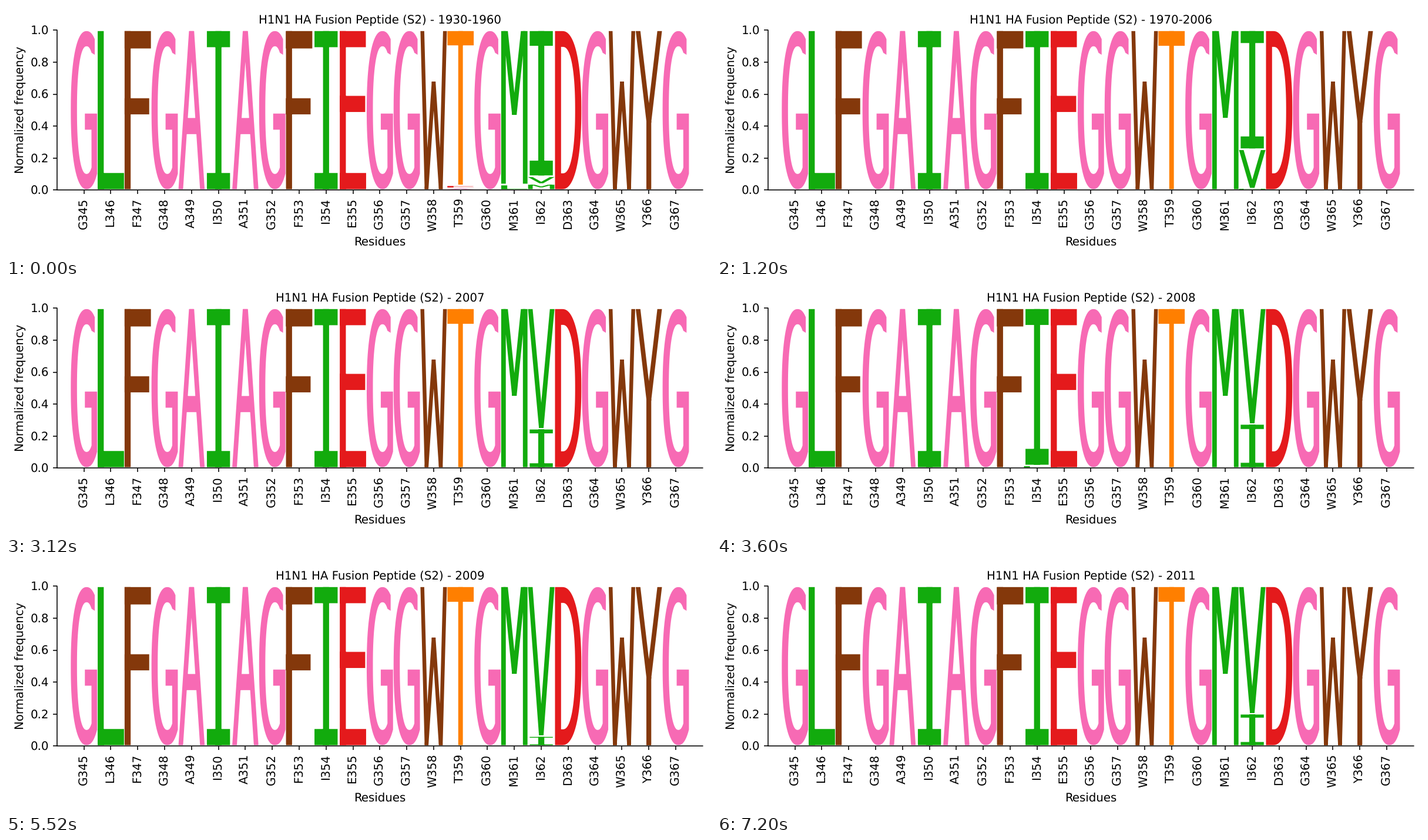
Animation of 1200x427 px, one loop 8000 ms. Source, as a matplotlib script:

```python
import numpy as np
import matplotlib.pyplot as plt
from matplotlib.animation import FuncAnimation
from matplotlib.patches import PathPatch
from matplotlib.path import Path

WIDTH, HEIGHT, DPI = 1200, 427, 128
PT = 141.8 / DPI            # scales point sizes to the drawing
STEP_MS, STEPS, HOLD = 400, 20, 3
FIRST, SEQUENCE = 345, "GLFGAIAGFIEGGWTGMIDGWYG"
PAD = 0.0105                # gap between stacked letters
HALF = 0.489                # half the width of a letter, in columns

COLORS = {}
for group, color in (("GA", "#f76ab4"), ("T", "#ff7f00"), ("FWY", "#84380b"),
                     ("LIMV", "#12ab0d"), ("DE", "#e41a1c")):
    COLORS.update(dict.fromkeys(group, color))

# Share of each letter where a residue varies; the largest one fills up to 1.
PERIODS = {
    "1930-1960": {359: dict(A=0.012, E=0.016, T=1), 361: dict(L=0.034, M=1),
                  362: dict(M=0.038, V=0.048, I=1)},
    "1970-2006": {362: dict(M=0.009, V=0.246, I=1)},
    "2007": {362: dict(I=0.246, V=1)},
    "2008": {354: dict(L=0.015, I=1), 362: dict(I=0.276, V=1)},
    "2009": {362: dict(I=0.062, V=1)},
    "2010": {362: dict(I=0.122, V=1)},
    "2011": {362: dict(I=0.202, V=1)},
}

# Letters are unions of strokes in a box with x from -1 to 1 and y from 0 to 1.
STEM, LIMB, THIN, BAR = 0.46, 0.35, 0.29, 0.102


def stroke(x0, y0, x1, y1, width=LIMB):
    w = width / 2
    return [(x0 - w, y0), (x0 + w, y0), (x1 + w, y1), (x1 - w, y1)]


def stem(x, width=STEM, top=1):
    return stroke(x, 0, x, top, width)


def bar(x0, x1, top, height=BAR):
    return stroke((x0 + x1) / 2, top - height, (x0 + x1) / 2, top, x1 - x0)


def both(*loops):
    return [*loops, *([(-x, y) for x, y in reversed(loop)] for loop in loops)]


def arc(cx, rx, ry, start, end, power=2.3):
    """Part of a superellipse centred on half height."""
    t = np.radians(np.linspace(start, end, 60))
    c, s = np.cos(t), np.sin(t)
    return list(zip(cx + rx * np.sign(c) * np.abs(c) ** (2 / power),
                    0.5 + ry * np.sign(s) * np.abs(s) ** (2 / power)))


def outline(loops):
    return Path.make_compound_path(
        *(Path([*loop, loop[0]], closed=True) for loop in loops))


left_stem = stem(STEM / 2 - 1)
GLYPHS = {letter: outline(loops) for letter, loops in {
    "L": [left_stem, bar(-1, 1, BAR)],
    "F": [left_stem, bar(-1, 1, 1, 0.11), bar(-1, 0.87, 0.575)],
    "E": [left_stem, bar(-1, 0.98, 1), bar(-1, 0.93, 0.59), bar(-1, 1, BAR)],
    "I": [stem(0), bar(-0.88, 0.88, 1), bar(-0.88, 0.88, BAR)],
    "T": [stem(0, LIMB), bar(-1, 1, 1, 0.093)],
    "A": both(stroke(-0.82, 0, -0.02, 1)) + [bar(-0.46, 0.46, 0.45)],
    "V": both(stroke(0, 0, -0.83, 1)),
    "W": both(stroke(-0.54, 0, -0.86, 1, THIN), stroke(-0.54, 0, 0, 0.68, THIN)),
    "M": both(stem(-0.825, LIMB), stroke(0, 0.452, -0.67, 1)),
    "Y": both(stem(0, LIMB, 0.43), stroke(0, 0.42, -0.82, 1)),
    "D": [[(-1, 0), *arc(-0.45, 1.45, 0.5, -90, 90), (-1, 1)],
          [(STEM - 1, 0.9), *arc(-0.4, 0.93, 0.4, 90, -90), (STEM - 1, 0.1)]],
    "G": [[*arc(0.2, 1.2, 0.5, 62, 309), (1, 0.478), (0.07, 0.478), (0.07, 0.376),
           (0.57, 0.376), *arc(0.2, 0.73, 0.404, 298, 62), (0.82, 0.85)]],
}.items()}

plt.rcParams.update({
    "font.family": "DejaVu Sans", "font.size": 10 * PT,
    "axes.titlesize": 10 * PT, "axes.titlepad": 6 * PT,
    "axes.labelpad": 4 * PT, "axes.linewidth": 0.8 * PT,
    "text.hinting": "none", "path.snap": False,
})
for axis in ("xtick", "ytick"):
    plt.rcParams.update({f"{axis}.major.size": 3.5 * PT,
                         f"{axis}.major.pad": 3.5 * PT,
                         f"{axis}.major.width": 0.8 * PT})

fig = plt.figure(figsize=(WIDTH / DPI, HEIGHT / DPI), dpi=DPI, facecolor="white")
left, right, top, bottom = 86.9, 1185.8, 41.4, 314.2
ax = fig.add_axes([left / WIDTH, 1 - bottom / HEIGHT,
                   (right - left) / WIDTH, (bottom - top) / HEIGHT])
ax.set(xlim=(0, len(SEQUENCE) + 1), ylim=(0, 1),
       xlabel="Residues", ylabel="Normalized frequency")
ax.spines[["top", "right"]].set_visible(False)
ax.set_xticks(range(1, len(SEQUENCE) + 1),
              [f"{aa}{FIRST + i}" for i, aa in enumerate(SEQUENCE)], rotation=90)
title = ax.set_title("")


def add_letter(letter, x, y, height):
    drawn = max(height - PAD, 0.5 * height)
    glyph = GLYPHS[letter]
    vertices = glyph.vertices * (HALF, drawn) + (x, y + (height - drawn) / 2)
    ax.add_patch(PathPatch(Path(vertices, glyph.codes),
                           facecolor=COLORS[letter], linewidth=0))


def draw(step):
    period = list(PERIODS)[step // HOLD]
    title.set_text(f"H1N1 HA Fusion Peptide (S2) - {period}")
    for patch in list(ax.patches):
        patch.remove()
    for i, residue in enumerate(SEQUENCE):
        y = 0
        for letter, share in PERIODS[period].get(FIRST + i, {residue: 1}).items():
            height = min(share, 1 - y)
            add_letter(letter, i + 1, y, height)
            y += height
    return []


anim = FuncAnimation(fig, draw, frames=STEPS, interval=STEP_MS,
                     init_func=lambda: [], repeat=True, repeat_delay=0)
plt.show()
```
